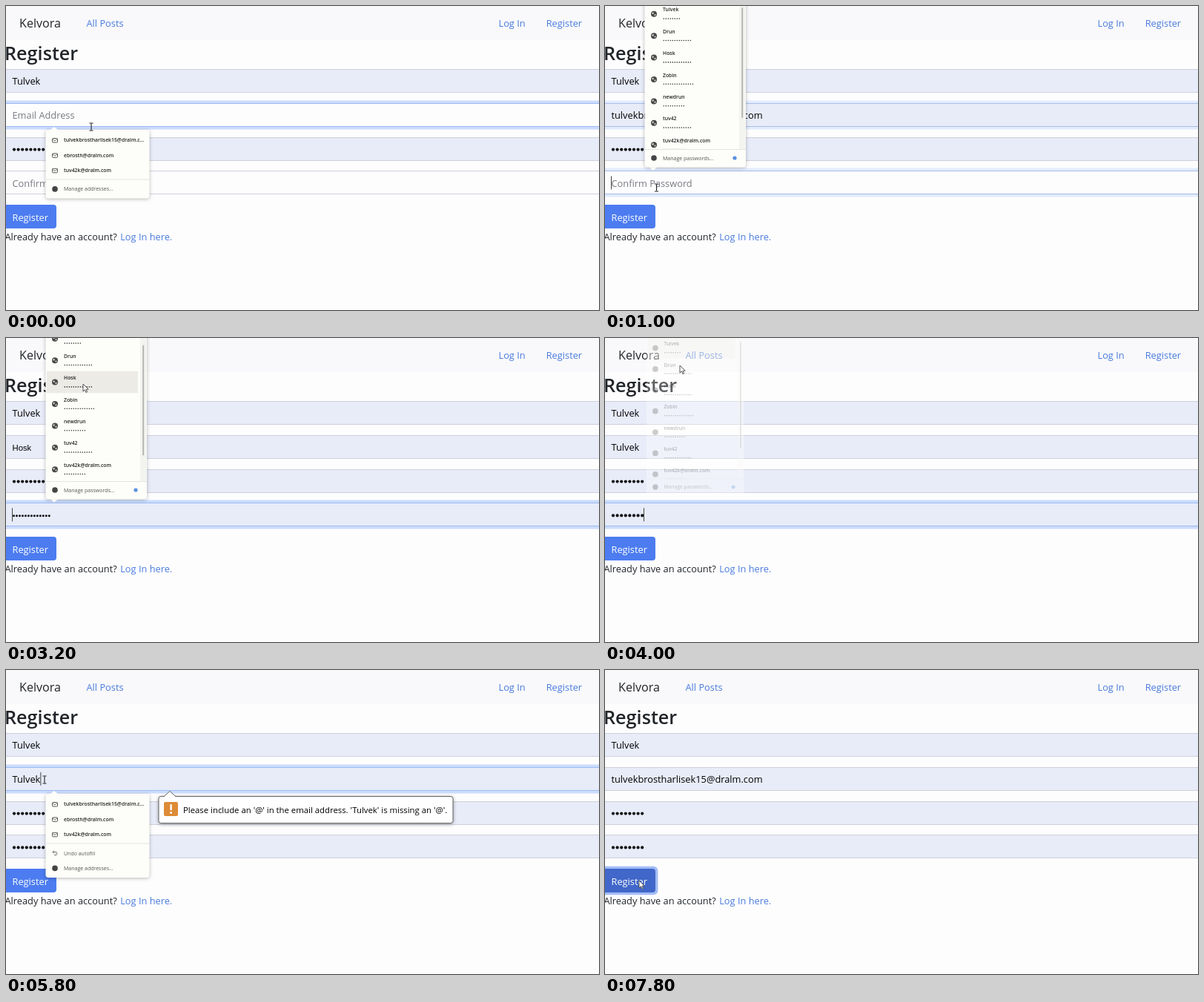
Write an HTML page with a canvas that moves like this. It is 800 by 410 pixels and loops after 8000 ms.

```html
<!DOCTYPE html>
<html lang="en">
<head>
<meta charset="utf-8">
<title>Register</title>
<style>
  html, body { margin: 0; width: 100%; height: 100%; overflow: hidden; background: #fdfdfe; }
  canvas { display: block; }
</style>
</head>
<body>
<canvas id="stage" width="800" height="410"></canvas>
<script>
const ctx = document.getElementById('stage').getContext('2d');
const LOOP = 8000, STEP = 200;
const SANS = '"Open Sans", "Noto Sans", sans-serif';
const ARIAL = '"Liberation Sans", Arial, sans-serif';
const BODY = `12.8px ${SANS}`, PREVIEW = `11.3px ${ARIAL}`;
const LINK = '#4a7bdc', INK = '#212529', AUTOFILL = '#e8ecf9';

const USER = 'Tulvek';
const MAIL = 'tulvekbrostharlisek15@dralm.com';
const ADDRESSES = ['tulvekbrostharlisek15@dralm.c...', 'ebrosth@dralm.com', 'tuv42k@dralm.com'];
const LOGINS = [
  [USER, 8], ['Drun', 13], ['Hosk', 13], ['Zobin', 14],
  ['newdrun', 10], ['tuv42', 13], ['tuv42k@dralm.com', 10]
];
const ROW = 29.4;

// time, x, y, pointer shape
const POINTER = [
  [0, 115, 163, 'beam'], [200, 116, 178, 'arrow'], [400, 115, 181, 'arrow'],
  [600, 102, 205, 'beam'], [1000, 69.5, 245, 'beam'], [1400, 69.5, 245, 'beam'],
  [1600, 74, 232, 'beam'], [1800, 88, 206, 'arrow'], [2000, 100, 185, 'arrow'],
  [2400, 107, 171, 'arrow'], [2800, 106, 122, 'arrow'], [3400, 103, 32, 'arrow'],
  [3600, 102, 15, 'arrow'], [3800, 101, 12, 'arrow'], [4000, 101, 37, 'arrow'],
  [4200, 92, 105, 'beam'], [4400, 68, 220, 'beam'], [4600, 50, 293, 'hand'],
  [4800, 49, 295, 'hand'], [5000, 49, 294, 'hand'], [5200, 49, 284, 'hand'],
  [5400, 50, 245, 'beam'], [5800, 52, 148, 'beam'], [6000, 58, 158, 'beam'],
  [6200, 78, 176, 'arrow'], [6600, 84, 180, 'arrow'], [6800, 80, 200, 'beam'],
  [7200, 60, 258, 'beam'], [7400, 50, 280, 'hand'], [7600, 46, 284, 'hand'],
  [7800, 46, 284, 'arrow']
];

function pointerAt(t) {
  const i = POINTER.findLastIndex(p => p[0] <= t);
  const a = POINTER[i], b = POINTER[i + 1] || a;
  const k = b === a ? 0 : (t - a[0]) / (b[0] - a[0]);
  return { x: a[1] + (b[1] - a[1]) * k, y: a[2] + (b[2] - a[2]) * k, shape: a[3] };
}

function text(str, x, y, font = BODY, color = INK) {
  ctx.font = font;
  ctx.fillStyle = color;
  ctx.fillText(str, x, y);
}

function box(x, y, w, h, r, fill, stroke) {
  ctx.beginPath();
  ctx.roundRect(x, y, w, h, r);
  if (fill) { ctx.fillStyle = fill; ctx.fill(); }
  if (stroke) { ctx.strokeStyle = stroke; ctx.lineWidth = 1; ctx.stroke(); }
}

function line(points, color, width = 1) {
  ctx.beginPath();
  points.forEach(([x, y]) => ctx.lineTo(x, y));
  ctx.strokeStyle = color;
  ctx.lineWidth = width;
  ctx.stroke();
}

function disc(x, y, r, color) {
  ctx.beginPath();
  ctx.arc(x, y, r, 0, 7);
  ctx.fillStyle = color;
  ctx.fill();
}

function dots(x, y, count, gap, r, color = '#111') {
  for (let i = 0; i < count; i++) disc(x + i * gap, y, r, color);
}

// A shadow would show through a translucent popup, so only solid ones cast it.
function withShadow(strength, draw) {
  ctx.save();
  if (ctx.globalAlpha === 1) {
    ctx.shadowColor = `rgba(0,0,0,${strength})`;
    ctx.shadowBlur = 5;
    ctx.shadowOffsetY = 1;
  }
  draw();
  ctx.restore();
}

// Popups fade while shrinking slightly around their centre.
function fading(alpha, cx, cy, draw) {
  if (!alpha) return;
  ctx.save();
  ctx.globalAlpha = alpha;
  if (alpha < 1) {
    ctx.translate(cx, cy);
    ctx.scale(.965, .965);
    ctx.translate(-cx, -cy);
  }
  draw();
  ctx.restore();
}

function field(index, { value, placeholder, secret, preview, ring = 0, caret }) {
  const y = 85 + index * 45.8, base = y + 21.4;
  const filled = value || secret;
  if (ring) box(-8, Math.round(y) - 3.4, 820, 38.8, 5, `rgba(60,125,250,${.26 * ring})`);
  box(-5, Math.round(y) + .5, 812, 31, 4, filled ? AUTOFILL : '#fdfdfe',
    ring ? (ring < 1 ? '#a9bde6' : '#9bbaf2') : '#cdd1da');
  let end = 8.5;
  if (secret) {
    if (preview) dots(10.5, y + 17.3, secret, 3.98, 1.5);
    else { dots(11, y + 17, secret, 5.6, 2.1); end = 52.5; }
  } else if (value) {
    text(value, 8.5, base, preview ? PREVIEW : BODY, '#000');
    if (!preview) end = 9 + ctx.measureText(value).width;
  } else {
    text(placeholder, 8.5, base, BODY, '#777b80');
  }
  if (caret) line([[end, y + 7], [end, y + 25]], '#444');
}

function button(hover, ring) {
  if (ring) box(-6, 264.8, 77.4, 38.4, 6, `rgba(75,125,240,${.5 * ring})`);
  box(-4, 268, 72, 32, 4, hover ? '#4067c9' : '#4c7cf0');
  text('Register', 8.5, 290, BODY, '#fff');
}

function page() {
  ctx.fillStyle = '#fdfdfe';
  ctx.fillRect(0, 0, 800, 410);
  ctx.fillStyle = '#f9f9fc';
  ctx.fillRect(0, 0, 800, 46);
  text('Kelvora', 18, 29, `16.1px ${SANS}`);
  text('All Posts', 108.5, 28, BODY, LINK);
  text('Log In', 664.5, 28, BODY, LINK);
  text('Register', 728.7, 28, BODY, LINK);
  text('Register', -2, 73, `600 25.2px ${SANS}`);
  text('Already have an account?', -1.5, 316);
  text('Log In here.', 154.2, 316, BODY, LINK);
}

const SMALL = `7px ${SANS}`, SMALL_BOLD = `600 6.85px ${SANS}`;
const PANEL = '#fdfdf9', HOVER = '#ecebe6', RULE = '#e3e3df';

function panel(x, y, w, h, tipY) {
  withShadow(.28, () => box(x, y, w, h, 4, PANEL));
  const edge = tipY < y ? y : y + h;
  ctx.beginPath();
  ctx.moveTo(60, edge);
  ctx.lineTo(65, tipY);
  ctx.lineTo(70, edge);
  ctx.fillStyle = PANEL;
  ctx.fill();
}

function addressPopup(hover, undo) {
  const bottom = undo ? 280 : 259.5;
  panel(53.5, 167, 140, bottom - 167, 163);
  ADDRESSES.forEach((mail, i) => {
    const y = 181 + i * 20.4;
    if (i === hover) box(54, y - 10, 139, 20.4, 0, HOVER);
    box(62.5, y - 2.5, 7, 5.5, 1, null, '#555');
    line([[62.5, y - 1.8], [66, y + .8], [69.5, y - 1.8]], '#555', .8);
    text(mail, 78, y + 2.4, SMALL_BOLD, '#222');
  });
  line([[54, 234], [193, 234]], RULE);
  if (undo) {
    line([[65, 243.5], [63, 245.5], [65, 247.5]], '#555', .8);
    line([[63, 245.5], [68, 245.5], [69, 247.5], [68, 249.5], [65, 249.5]], '#555', .8);
    text('Undo autofill', 78, 249.6, SMALL, '#555');
  }
  const y = bottom - 12.6;
  disc(66, y, 3.8, '#444');
  text('Manage addresses...', 78, y + 2.5, SMALL, '#555');
}

function globe(x, y) {
  disc(x, y, 4, '#484848');
  disc(x - 1.4, y - 1, 1.2, '#d5d5d2');
  disc(x + 1.5, y + 1.3, 1.1, '#d5d5d2');
}

function loginPopup(hover, scroll) {
  panel(53.5, -27, 136.5, 244.5, 221.5);
  ctx.save();
  ctx.beginPath();
  ctx.rect(54, -30, 136, 223);
  ctx.clip();
  LOGINS.forEach(([name, count], i) => {
    const y = 5 + i * ROW - scroll;
    if (i === hover) box(55, y - 9, 123, ROW, 0, HOVER);
    globe(66, y + 5.8);
    text(name, 78, y + 2.4, SMALL_BOLD, '#222');
    dots(79.3, y + 12.1, count, 3, .8, '#333');
  });
  box(181, -27, 8.5, 220, 0, '#f3f3f0');
  box(184.2, 2 + scroll * .75, 2, 149, 1, '#b5b5b3');
  ctx.restore();
  line([[54, 193.5], [190, 193.5]], RULE);
  disc(66, 205, 3.8, '#444');
  text('Manage passwords...', 78, 207.5, SMALL, '#555');
  disc(175, 205, 2.6, '#5b8fe0');
}

function warning() {
  withShadow(.45, () => box(206, 170.5, 397, 36, 3, '#fff'));
  box(206, 170.5, 397, 36, 3, '#fff', '#666');
  ctx.beginPath();
  ctx.moveTo(213, 171.2);
  ctx.lineTo(221, 163.5);
  ctx.lineTo(229, 171.2);
  ctx.fillStyle = '#fff';
  ctx.fill();
  line([[213, 170.5], [221, 163.5], [229, 170.5]], '#666');
  box(213, 178, 19, 19, 2, '#dd8b37');
  box(221.4, 181, 2.4, 8.2, 1, '#fff');
  disc(222.6, 192.5, 1.4, '#fff');
  text(`Please include an '@' in the email address. '${USER}' is missing an '@'.`,
    239, 192.6, `11.35px ${SANS}`, '#000');
}

const SHAPES = {
  arrow: 'M0 0V10L2.4 7.8L4 11.4L5.6 10.7L4 7.2H7.2Z',
  hand: 'M-1 1Q0-.6 1 1V4.2Q4.8 4 5 6V9L3.8 12H-1.2L-4 7.5Q-3.6 6-1 8Z'
};

function pointer({ x, y, shape }) {
  if (shape === 'beam') {
    line([[x, y - 4.5], [x, y + 4.5]], '#222', 1.1);
    for (const dy of [-5, 5]) line([[x - 2.5, y + dy], [x + 2.5, y + dy]], '#222');
    return;
  }
  ctx.save();
  ctx.translate(x, y);
  const path = new Path2D(SHAPES[shape]);
  ctx.fillStyle = '#fff';
  ctx.fill(path);
  ctx.strokeStyle = '#444';
  ctx.lineWidth = .9;
  ctx.stroke(path);
  ctx.restore();
}

function draw(t) {
  const between = (a, b) => t >= a && t < b;
  const p = pointerAt(t);
  const scroll = between(2200, 3400) ? (t === 2200 ? 5 : 10) : 0;

  let hover = -1;
  if (between(2000, 4000))
    hover = Math.max(0, Math.min(6, Math.floor((p.y + 4 + scroll) / ROW)));
  const login = LOGINS[hover];
  const mailHover = t === 200 || between(6200, 6600);

  const email = { placeholder: 'Email Address' };
  if (mailHover) Object.assign(email, { value: MAIL, preview: true });
  else if (login) Object.assign(email, { value: login[0], preview: true });
  else if (between(4000, 6200)) email.value = USER;
  else if (t >= 400) email.value = MAIL;

  const confirm = { placeholder: 'Confirm Password' };
  if (login) Object.assign(confirm, { secret: login[1], preview: true });
  else if (t >= 4000) confirm.secret = 8;

  if (t < 1000) email.ring = 1;
  else if (t === 1000) email.ring = confirm.ring = .5;
  else if (t < 4600) confirm.ring = 1;
  else if (t < 5000) { email.ring = t < 4800 ? .3 : .6; if (t < 4800) confirm.ring = .5; }
  else if (t < 7600) email.ring = 1;
  email.caret = between(200, 1000) || between(4600, 7600);
  confirm.caret = between(1000, 4600);

  page();
  field(0, { value: USER });
  field(1, email);
  field(2, { secret: 8 });
  field(3, confirm);
  button(between(4600, 5400) || t >= 7400, t < 7600 ? 0 : t < 7800 ? .5 : 1);

  const tip = t === 4800 ? .17 : between(5000, 6600) ? 1 : t === 6600 ? .2 : 0;
  fading(tip, 404, 188, warning);

  const list = t < 400 || between(5800, 6600) ? 1 : t === 400 || t === 6600 ? .22 : 0;
  fading(list, 123, 213, () => addressPopup(mailHover ? 0 : -1, t > 5000));

  const logins = between(1000, 4000) ? 1 : t === 4000 ? .28 : 0;
  fading(logins, 121, 91, () => loginPopup(t === 4000 ? 0 : hover, scroll));

  pointer(p);
}

const start = performance.now();
function tick() {
  const t = (performance.now() - start) % LOOP;
  draw(Math.floor(t / STEP) * STEP);
  requestAnimationFrame(tick);
}
tick();
</script>
</body>
</html>
```
